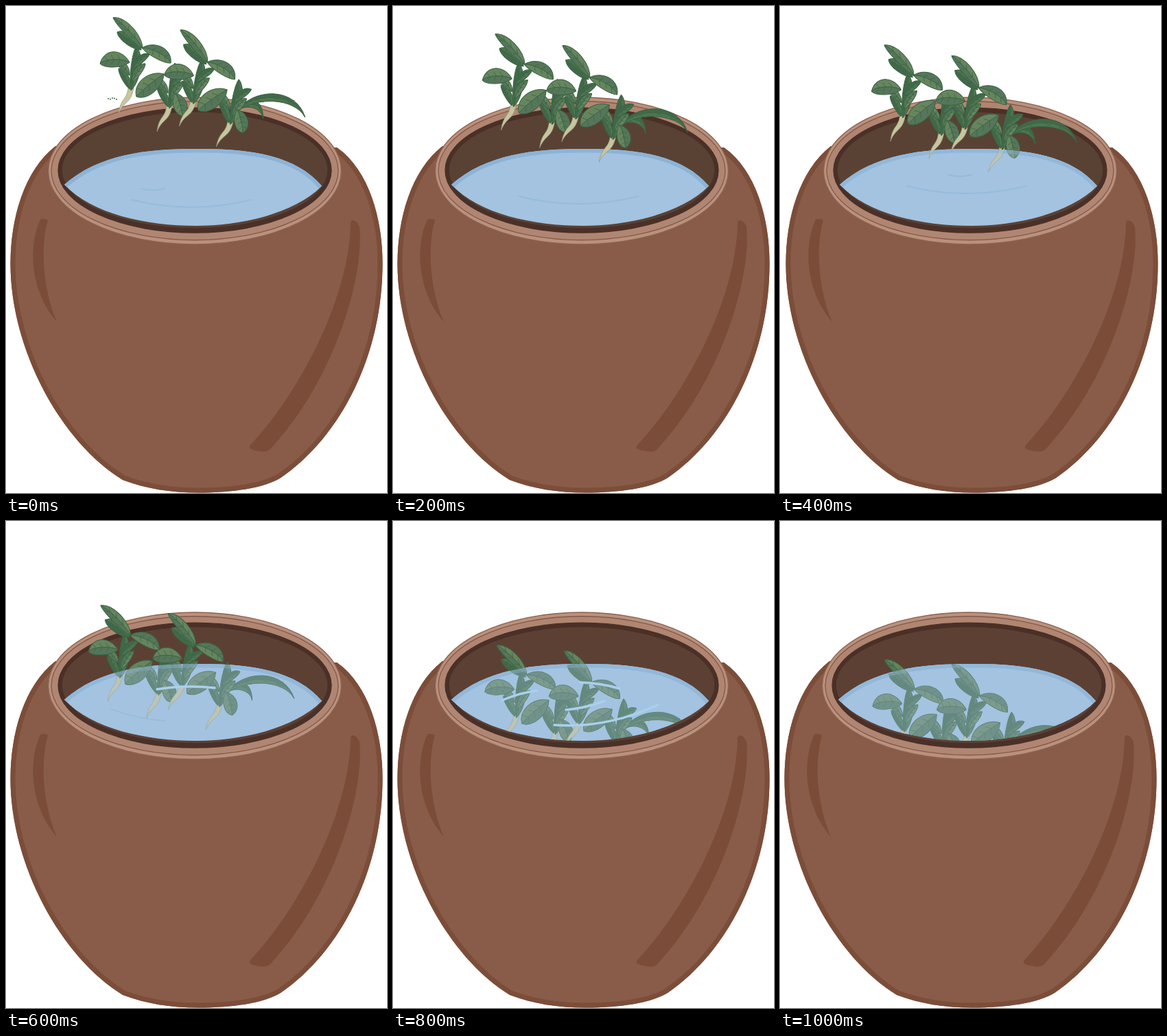
An HTML page with a canvas that plays this animation: 555x709 px, repeating every 1.2 s.

```html
<!DOCTYPE html>
<html lang="en">
<head>
<meta charset="utf-8">
<title>Herbs dipping into a jar</title>
<style>
  html, body { margin: 0; width: 100%; height: 100%; overflow: hidden; background: #fff; }
  canvas { display: block; width: 100vw; height: 100vh; }
</style>
</head>
<body>
<canvas id="stage" width="555" height="709"></canvas>
<script>
const ctx = document.getElementById('stage').getContext('2d');
const STEP = 200;
const SINK = [0, 24, 40, 106, 164, 185];
const SWAY = [0, -7, -4, -18, -5, -4];

const WATER = '#a3c3e0', FAINT = '#96bbdc', GLINT = '#a9d0ec';
const DARK = ['#41694a', '#4e7551'], LIGHT = ['#55765a', '#66855f'];

const body = new Path2D('M72 204C26 240 6.5 310 6.5 375C6.5 500 80 635 170 690C205 703 240 708.5 280 708.5C330 708.5 375 702 400 687C490 625 548.5 505 548.5 375C548.5 310 529 239 482 206Z');
const shadeLeft = new Path2D('M50 311Q55 308 61 312C50 350 53 410 74 460C35 415 32 350 50 311Z');
const shadeRight = new Path2D('M502 316C502 309 512 311 515 322C522 395 478 545 386 644Q379 653 357 645Q352 643 357 638C422 570 500 430 502 316Z');
const surface = 'C135 216 205 208 275 208C350 207 422 216 460 262';
const basin = 'C420 303 340 320 277 320C205 320 125 303 85 260';
const water = new Path2D('M85 260' + surface + basin + 'Z');
const waterLine = new Path2D('M85 260' + surface);
const visible = new Path2D('M0 0H555V262H460' + basin + 'H0Z');

function fill(path, color) {
  ctx.fillStyle = color;
  ctx.fill(path);
}

function line(path, color, width) {
  ctx.strokeStyle = color;
  ctx.lineWidth = width;
  ctx.stroke(path);
}

function oval(rx, ry, color, edge) {
  const p = new Path2D();
  p.ellipse(275, 240 - (213.5 - rx) * 0.06, rx, ry, 0, 0, 7);
  fill(p, color);
  line(p, edge, 1.3);
}

// Points along a leaf: u from base to tip, off to its side
function leaf(x, y, tx, ty, w, bend, [dark, light]) {
  const dx = tx - x, dy = ty - y, len = Math.hypot(dx, dy);
  const at = (u, off) => [x + dx * u - dy / len * off, y + dy * u + dx / len * off];
  const half = w * 0.62;
  const blade = (a, b) => {
    const p = new Path2D();
    p.moveTo(x, y);
    p.bezierCurveTo(...at(0.25, a), ...at(0.85, a), tx, ty);
    p.bezierCurveTo(...at(0.85, b), ...at(0.25, b), x, y);
    return p;
  };
  const whole = blade(bend + half, bend - half);
  fill(whole, dark);
  fill(blade(bend + half, bend), light);
  const veins = blade(bend, bend);
  for (let u = 0.3; u < 0.8; u += 0.22) {
    const mid = bend * 3 * u * (1 - u);
    for (const s of [-1, 1]) {
      veins.moveTo(...at(u, mid));
      veins.lineTo(...at(u + 0.1, mid + s * w * 0.28));
    }
  }
  line(veins, '#3f6845', 0.9);
  line(whole, '#3b6343', 1);
}

function root(x, y) {
  const p = new Path2D();
  p.moveTo(x - 4, y - 4);
  p.bezierCurveTo(x - 6, y + 15, x - 15, y + 10, x - 18, y + 34);
  p.bezierCurveTo(x - 10, y + 14, x, y + 20, x + 4, y - 4);
  fill(p, '#c6c5a0');
  line(p, '#929977', 0.7);
}

// Upright stem with smaller leaves alternating up its sides
function sprig(x, y, h) {
  root(x, y);
  leaf(x, y, x + h * 0.12, y - h, 15, 4, DARK);
  for (let k = 0; k < 4; k++) {
    const side = k % 2 ? 1 : -1, by = y - 2 - 10 * k;
    leaf(x + side * 2, by, x + side * (18 + 3 * k), by - 30 + 3 * k, 11, side * -3, k % 3 ? LIGHT : DARK);
  }
}

function bunch(x, y, tilt, arching) {
  ctx.save();
  ctx.translate(x, y);
  ctx.rotate(tilt * Math.PI / 180);
  ctx.translate(-157, -18);
  sprig(182, 123, 64);
  leaf(180, 82, 137, 84, 24, 7, LIGHT);
  leaf(198, 61, 240, 83, 20, -7, LIGHT);
  leaf(197, 64, 162, 38, 16, 2, DARK);
  leaf(199, 62, 156, 17, 15, 5, LIGHT);
  if (arching) {
    leaf(245, 130, 285, 137, 11, -22, DARK);
    leaf(243, 133, 346, 131, 12, -35, DARK);
  }
  sprig(238, 149, 66);
  leaf(230, 99, 190, 132, 27, 2, LIGHT);
  leaf(247, 127, 257, 160, 21, -2, LIGHT);
  ctx.restore();
}

function drawJar(warm) {
  fill(body, '#885c49');
  ctx.save();
  ctx.clip(body);
  line(body, '#7c4d39', 14);
  ctx.restore();
  fill(shadeLeft, '#7b4c38');
  fill(shadeRight, '#7b4c38');
  oval(213.5, 107, '#ba917c', '#8d6250');
  oval(209, 101, '#b08672', '#85594a');
  oval(199, 91, '#4a3027', '#4a3027');
  oval(194, 85, warm ? '#5c4034' : '#594234', '#4a3027');
}

function arc(x, y, dx, dy, sag, color, width) {
  const p = new Path2D();
  p.moveTo(x, y);
  p.quadraticCurveTo(x + dx / 2, y + dy / 2 + sag * 2, x + dx, y + dy);
  line(p, color, width);
}

function drawRipples(i) {
  ctx.lineCap = 'round';
  if (i < 3) {
    const y = 282 - 5 * i * i;
    arc(183, y, 174, 0, 11, FAINT, 2);
    if (i !== 1) arc(197 + 23 * i, y - 16, 34, 0, 2, FAINT, 2);
  } else if (i === 3) {
    arc(220, 245, 84, -2, -3, GLINT, 3.5);
    arc(153, 274, 79, 17, 3, FAINT, 1.5);
  } else if (i === 4) {
    arc(159, 261, 51, -14, -2, GLINT, 3.5);
    arc(272, 235, 58, 9, -2, GLINT, 3.5);
    arc(252, 275, 56, -13, 2, GLINT, 3.5);
    arc(235, 297, 150, -29, 10, GLINT, 3.5);
  }
}

function drawSplash() {
  ctx.fillStyle = DARK[0];
  for (let k = 0; k < 5; k++) ctx.fillRect(148 + 3 * k, 134 + Math.sin(k * 2), 2, 1.5);
}

function draw(i) {
  const sink = SINK[i], sway = SWAY[i], tilt = -sink / 110;
  const wet = i > 1, shift = i === 2 ? 2 : 0;
  ctx.fillStyle = '#fff';
  ctx.fillRect(0, 0, 555, 709);
  ctx.save();
  ctx.translate(shift, 0);
  drawJar(i > 2);
  fill(water, WATER);
  ctx.save();
  ctx.clip(water);
  line(waterLine, '#8cb3d7', 11);
  if (!wet) drawRipples(i);
  ctx.restore();

  ctx.save();
  ctx.clip(visible);
  ctx.translate(-shift, 0);
  bunch(157 + sway, 18 + sink, tilt, false);
  bunch(255 + sway, 36 + sink * 0.94, tilt + 4, true);
  if (i === 0) drawSplash();
  ctx.restore();

  // Submerged parts show through a veil of water
  if (wet) {
    ctx.save();
    ctx.clip(water);
    ctx.globalAlpha = 0.36;
    fill(water, WATER);
    line(waterLine, '#8cb3d7', 11);
    ctx.globalAlpha = 1;
    drawRipples(i);
    ctx.restore();
  }
  ctx.restore();
}

let shown = -1;
function tick() {
  const i = Math.floor(performance.now() / STEP) % SINK.length;
  if (i !== shown) draw(shown = i);
  requestAnimationFrame(tick);
}
tick();
</script>
</body>
</html>
```
